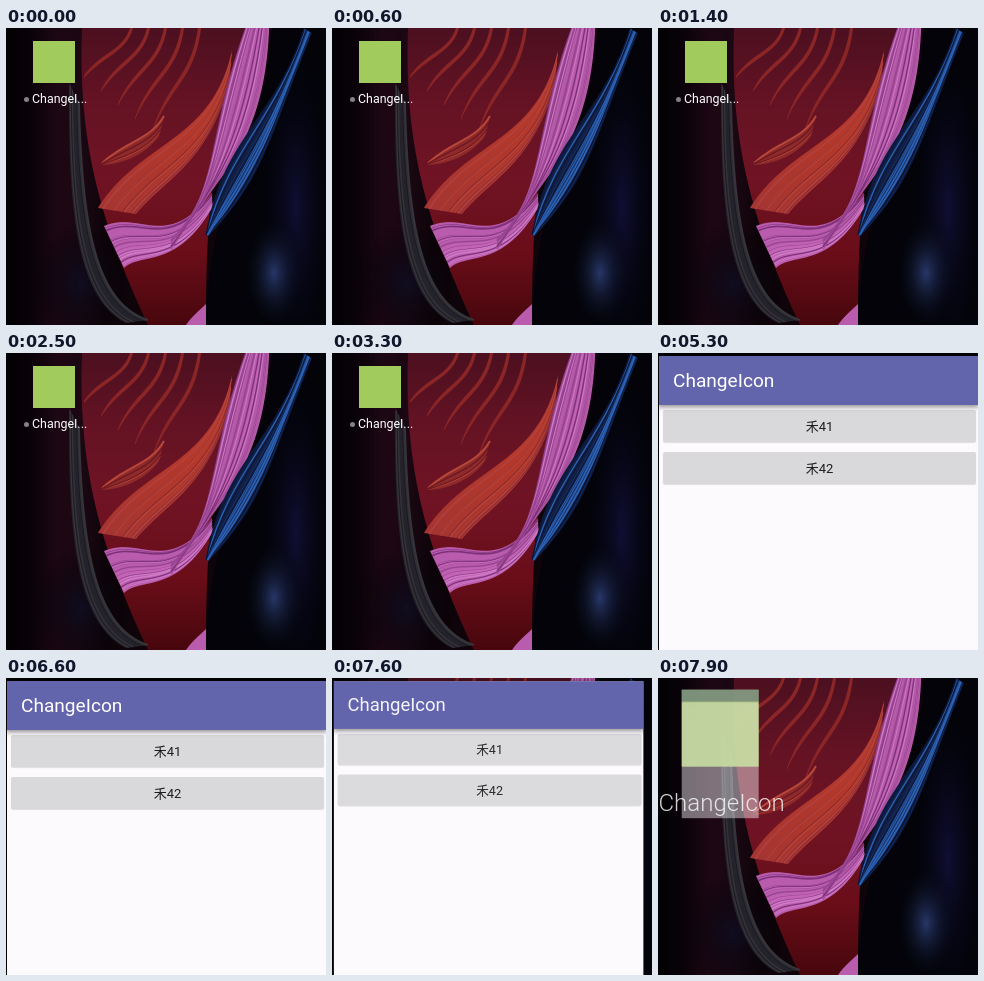
Animation, 320 px wide and 297 px high, one loop 8 s. Source, as an HTML page with a canvas:

```html
<!DOCTYPE html>
<html lang="en">
<head>
<meta charset="utf-8">
<title>ChangeIcon</title>
<style>
html, body { margin: 0; width: 100%; height: 100%; overflow: hidden; background: #000; }
body { font-family: Roboto, "Noto Sans CJK SC", "Noto Sans CJK", sans-serif; }
#stage { position: relative; width: 320px; height: 297px; overflow: hidden; }
#stage > * { position: absolute; left: 0; top: 0; }
#wall { width: 320px; height: 297px; }
#icon { width: 42px; height: 42px; background: #a1cb5c; transform-origin: 0 0; }
#stage > #caption { left: 26px; top: 63px; font-size: 12.4px; line-height: 16px; color: #fff; white-space: nowrap; }
#caption::before { content: ""; position: absolute; left: -8px; top: 6px; width: 5px; height: 5px; border-radius: 50%; background: #858187; }
#zoomed { line-height: 1; font-weight: 300; color: #fff; white-space: nowrap; }
#app { width: 319px; height: 547px; background: #fdfafe; transform-origin: 0 0; }
#bar { position: relative; height: 49px; background: #6264ac; box-shadow: 0 1px 5px 1px rgba(0,0,0,.45); color: #fff; font-size: 19.1px; line-height: 50px; text-indent: 14px; z-index: 1; }
.button { margin: 5px 2px 10px 4px; height: 32px; border-radius: 2px; background: #d9d8da; box-shadow: 0 1px 1px rgba(0,0,0,.12); color: #1d1c1e; font-size: 13px; line-height: 33px; text-align: center; }
#bar span, .button { opacity: var(--detail); }
</style>
</head>
<body>
<div id="stage">
  <canvas id="wall" width="640" height="594"></canvas>
  <div id="icon"></div>
  <div id="caption">ChangeI...</div>
  <div id="app">
    <div id="bar"><span>ChangeIcon</span></div>
    <div class="button">禾41</div>
    <div class="button">禾42</div>
  </div>
  <div id="zoomed">ChangeIcon</div>
</div>
<script>
const $ = id => document.getElementById(id);
const clamp = v => Math.max(0, Math.min(1, v));
const mix = (a, b, k) => a + (b - a) * k;
const ctx = $("wall").getContext("2d");

let seed = 7;
const random = () => (seed = seed * 16807 % 2147483647) / 2147483647;

function gradient(x, y, ...colors) {
  const g = ctx.createLinearGradient(0, 0, x, y);
  colors.forEach((c, i) => g.addColorStop(i / (colors.length - 1), c));
  return g;
}

// Fills the area between two cubic edges and combs it with random strands.
function ribbon(a, b, fill, strands = 0, tones = []) {
  ctx.beginPath();
  ctx.moveTo(a[0], a[1]);
  ctx.bezierCurveTo(...a.slice(2));
  ctx.lineTo(b[6], b[7]);
  ctx.bezierCurveTo(b[4], b[5], b[2], b[3], b[0], b[1]);
  ctx.fillStyle = fill;
  ctx.fill();
  for (let i = 0; i < strands; i++) {
    const k = random();
    const c = a.map((v, j) => mix(v, b[j], k));
    ctx.beginPath();
    ctx.moveTo(c[0], c[1]);
    ctx.bezierCurveTo(...c.slice(2));
    ctx.strokeStyle = tones[i % tones.length];
    ctx.lineWidth = .4 + 1.8 * random() ** 2;
    ctx.stroke();
  }
}

function glow(x, y, rx, ry, color) {
  ctx.save();
  ctx.translate(x, y);
  ctx.scale(rx, ry);
  const g = ctx.createRadialGradient(0, 0, 0, 0, 0, 1);
  g.addColorStop(0, color);
  g.addColorStop(1, "transparent");
  ctx.fillStyle = g;
  ctx.fillRect(-1, -1, 2, 2);
  ctx.restore();
}

function paintWall() {
  ctx.scale(2, 2);
  ctx.fillStyle = gradient(100, 0, "#020104", "#0a0309", "#1d0714", "#1b0813", "#0e040a");
  ctx.fillRect(0, 0, 320, 297);
  glow(75, 255, 50, 60, "rgba(16,14,34,.9)");

  // Canyon wall and its ridges
  ribbon([76, 0, 72, 110, 92, 190, 142, 297], [240, 0, 205, 100, 200, 200, 200, 297],
    gradient(0, 297, "#4c1020", "#651324", "#701324", "#6b0e1a", "#48070d"));
  for (let i = 0; i < 5; i++) {
    const x = 124 + 17 * i, y = 48 + 14 * i;
    ribbon([x, 0, x - 8, y / 2, x - 30, y / 2, x - 46, y], [x + 3, 0, x - 3, y / 2, x - 28, y / 2 + 5, x - 46, y + 2],
      "#8c2626");
  }
  ribbon([158, 88, 144, 112, 122, 112, 96, 135], [153, 108, 142, 124, 120, 136, 96, 137],
    "#8f2a2a", 6, ["#b8483a", "#6d1822"]);
  ribbon([226, 22, 206, 115, 135, 112, 92, 180], [223, 55, 202, 135, 160, 150, 130, 186],
    gradient(-110, 190, "#b5382a", "#a53532", "#a63e42"), 14, ["#bd4a3c", "#882a30", "#b14344"]);

  // Pink pillar and its foot
  const pinks = ["#cf78c4", "#7d3078", "#c364b6", "#984490"];
  ribbon([98, 198, 135, 182, 160, 224, 206, 165], [118, 240, 135, 224, 170, 242, 206, 180], "#b95cae", 22, pinks);
  ribbon([240, 0, 200, 110, 214, 168, 165, 212], [263, 0, 258, 125, 206, 150, 165, 222], "#b258a6", 28, pinks);
  ribbon([200, 276, 194, 282, 186, 288, 180, 297], [200, 280, 200, 285, 200, 290, 200, 297], "#b95cae");

  // Grey streaks at the left
  ribbon([63, 55, 62, 180, 70, 270, 120, 295], [73, 75, 76, 200, 90, 275, 142, 292],
    "#24222a", 10, ["#37353a", "#191722", "#2e3034"]);

  // Dark right side with blue strands
  ribbon([266, 0, 262, 110, 206, 140, 200, 297], [320, 0, 320, 100, 320, 200, 320, 297], "#030309");
  glow(290, 180, 44, 190, "rgba(20,18,62,.8)");
  glow(268, 245, 32, 60, "rgba(48,68,128,.8)");
  ribbon([298, 0, 270, 90, 215, 110, 200, 207], [305, 5, 262, 110, 258, 150, 202, 207],
    gradient(-300, 200, "#132046", "#132046"), 26, ["#2c62b4", "#0a1230", "#1d4184", "#0d1a40"]);
}

// Smooth 450 ms transition starting at the given time.
function ease(ms, start) {
  const k = clamp((ms - start) / 450);
  return k * k * (3 - 2 * k);
}

function show(ms) {
  const step = Math.floor(ms / 100) * 100;
  const p = ease(step, 3750) - ease(step, 7550);
  const home = p === 0;
  const x = mix(27, 1, p), y = mix(13, 3, p);
  const w = mix(42, 319, p), h = mix(68, 547, p);

  $("wall").style.visibility = p === 1 ? "hidden" : "visible";
  $("caption").style.visibility = home ? "visible" : "hidden";

  $("icon").style.transform = `translate(${x}px,${y}px) scale(${w / 42})`;
  $("icon").style.opacity = clamp(1.6 - 5.7 * p);

  const app = $("app").style;
  app.transform = `translate(${x}px,${y}px) scale(${w / 319},${h / 547})`;
  app.opacity = home ? 0 : clamp(.11 + 2.6 * p);
  app.setProperty("--detail", p * p);

  const label = $("zoomed").style;
  label.fontSize = mix(19.6, 54.9, p) + "px";
  label.transform = `translate(${mix(55, 123, p)}px,${mix(99.6, 302.6, p)}px) translate(-50%,-50%)`;
  label.opacity = home ? 0 : clamp(.95 - 1.1 * p);
}

paintWall();
const start = performance.now();
function tick() {
  show((performance.now() - start) % 8000);
  requestAnimationFrame(tick);
}
tick();
</script>
</body>
</html>
```
